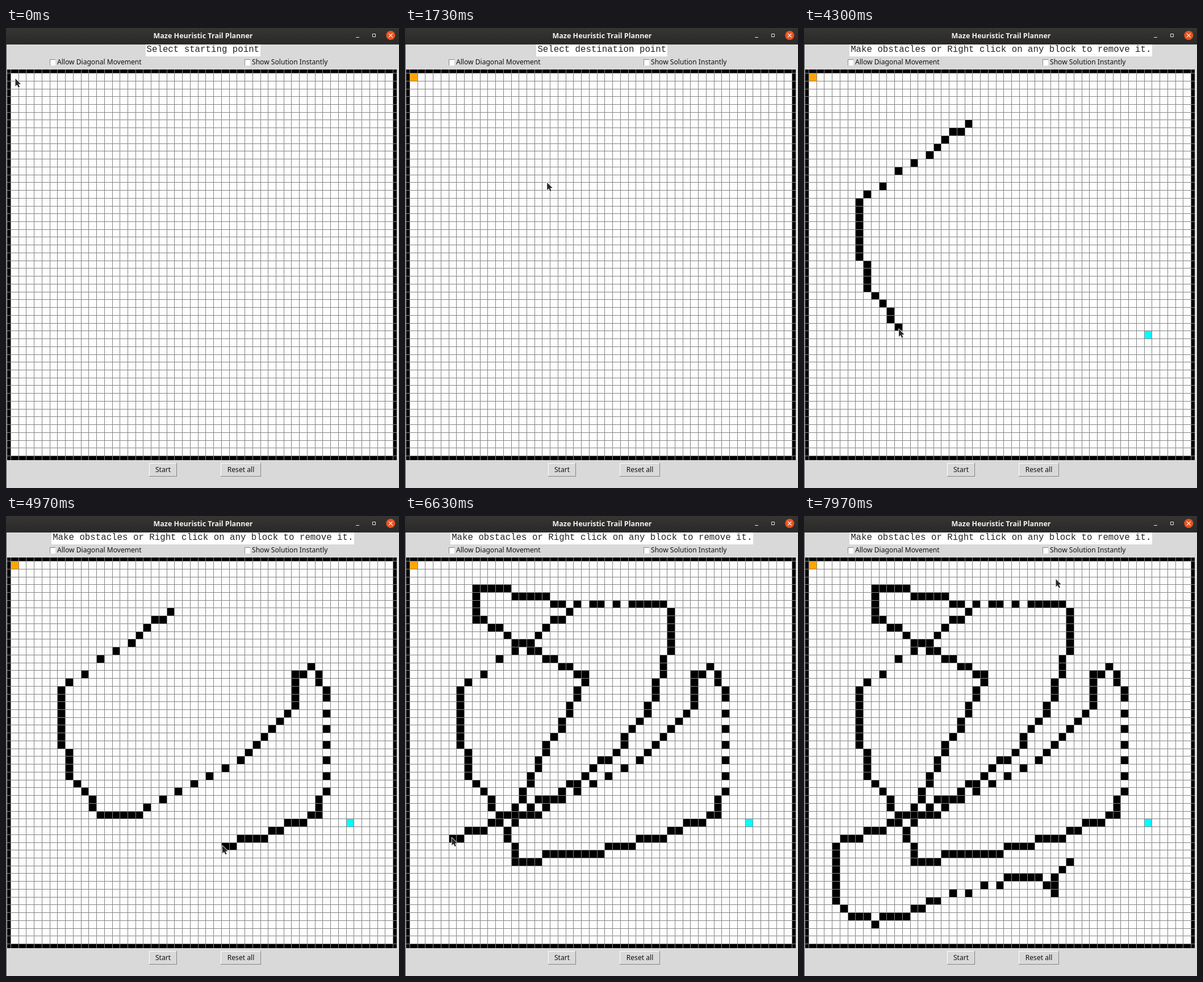
An HTML page with a canvas that plays this animation: 692 by 809 pixels, repeating every 8 s.

```html
<!DOCTYPE html>
<html lang="en">
<head>
<meta charset="utf-8">
<title>Maze Heuristic Trail Planner</title>
<style>
  html, body { margin: 0; width: 692px; height: 809px; overflow: hidden; background: #d9d9d9; }
  canvas { display: block; }
</style>
</head>
<body>
<canvas id="stage" width="692" height="809"></canvas>
<script>
const ctx = document.getElementById('stage').getContext('2d');
const LOOP = 8000, TICK = 100 / 3;
const CELLS = 49, PITCH = 13.735, LEFT = 8, TOP = 79.05;
const UI_FONT = '12.1px "Noto Sans", "Open Sans", sans-serif';
const INK = '#111', LINE = '#858585', FACE = '#d9d9d9';

const START_CLICK = 430, END_CLICK = 3430, DRAW_START = 3900;
const START = [0, 0], END = [43, 33];

// Corners of each pointer stroke, in cells.
const strokes = [
  { until: 4299, corners: [
    [20, 6], [18, 7], [15, 9.8], [7, 15], [6, 16], [6, 23], [7, 25], [7.3, 27], [11, 32.3]] },
  { until: 5665, corners: [
    [17, 31.4], [29, 25], [36, 18], [36, 14], [38, 13], [40, 17], [39.8, 29], [38.6, 32],
    [35, 33], [32, 35], [29, 35.4], [24, 36.6], [19, 37], [16, 37.6], [13, 38], [12.8, 36],
    [12.1, 34], [13.4, 31], [15, 28], [17.4, 23], [20.4, 18], [22, 14], [15, 11],
    [13, 9.6], [8, 6.6], [8, 6]] },
  { until: 6632, corners: [
    [8, 3], [12, 3.4], [19, 4.9], [28, 5], [32, 5], [33, 6], [33, 11], [32.4, 12],
    [30.4, 18], [26, 24], [24, 25], [21, 27.9], [19, 29], [18, 30], [16, 30], [14, 32],
    [12, 32], [9, 34], [5, 34.9]] },
  { until: 7250, corners: [
    [3, 36], [3, 43], [5, 45], [8, 45.6], [12, 45], [14, 43.8], [16, 42.8], [24, 41],
    [25, 40], [29, 40], [31, 42], [31, 40], [33, 38]] }
];

const lerp = (a, b, u) => a.map((v, i) => v + (b[i] - v) * u);
const smooth = u => u * u * (3 - 2 * u);

// The hand moves twice as fast on long legs, which leaves gaps in the wall.
function sampleLeg(from, to) {
  const length = Math.max(Math.abs(to[0] - from[0]), Math.abs(to[1] - from[1]));
  const n = Math.max(1, Math.round(length >= 8 ? length / 2 : length));
  return Array.from({ length: n }, (_, i) => lerp(from, to, (i + 1) / n));
}

const trail = [strokes[0].corners[0]];
const pace = [[DRAW_START, 0]];
for (const { until, corners } of strokes) {
  for (const corner of corners) trail.push(...sampleLeg(trail[trail.length - 1], corner));
  pace.push([until, trail.length - 1]);
}
const DRAW_END = pace[pace.length - 1][0];

const gridX = i => Math.round(LEFT + i * PITCH);
const gridY = i => Math.round(TOP + i * PITCH);
const center = ([c, r]) => [LEFT + (c + .5) * PITCH, TOP + (r + .5) * PITCH];

const approach = [[1150, 16.5, 89], [2500, 602.5, 547], [3350, 602.5, 547], [3500, 605, 543],
  [DRAW_START, ...center(trail[0])]];
const leave = [[DRAW_END, ...center(trail[trail.length - 1])], [7330, 470, 600], [7720, 443.5, 111]];

function track(keys, t, ease = u => u) {
  const k = keys.findIndex(key => key[0] > t);
  if (k === 0) return keys[0].slice(1);
  if (k < 0) return keys[keys.length - 1].slice(1);
  const [t0, ...a] = keys[k - 1], [t1, ...b] = keys[k];
  return lerp(a, b, ease((t - t0) / (t1 - t0)));
}

function pointerAt(t, progress) {
  if (t < DRAW_START) return track(approach, t, smooth);
  if (t >= DRAW_END) return track(leave, t, smooth);
  const i = Math.floor(progress);
  return center(lerp(trail[i], trail[i + 1], progress - i));
}

function box(color, x, y, w, h) {
  ctx.fillStyle = color;
  ctx.fillRect(x, y, w, h);
}

function text(str, x, y, font, color = INK, align = 'left') {
  ctx.font = font;
  ctx.fillStyle = color;
  ctx.textAlign = align;
  ctx.fillText(str, x, y);
}

function cells(color, c, r, span = 1) {
  box(color, gridX(c), gridY(r), gridX(c + span) - gridX(c), gridY(r + span) - gridY(r));
}

function titleBar() {
  const shade = ctx.createLinearGradient(0, 0, 0, 29);
  shade.addColorStop(0, '#363533');
  shade.addColorStop(1, '#292927');
  box(shade, 0, 0, 692, 29);
  text('Maze Heuristic Trail Planner', 347, 18,
    'bold 12.5px "Noto Sans", "Open Sans", sans-serif', '#f4f2ee', 'center');
  box('#e8e6e2', 616, 16, 6, 1);
  ctx.lineWidth = 1;
  ctx.strokeStyle = '#e8e6e2';
  ctx.strokeRect(645.5, 10.5, 5, 5);
  ctx.fillStyle = '#e95420';
  ctx.beginPath();
  ctx.arc(677.3, 13, 8, 0, 7);
  ctx.fill();
  ctx.strokeStyle = '#fff';
  ctx.lineWidth = 1.2;
  ctx.beginPath();
  ctx.moveTo(674, 9.7); ctx.lineTo(680.6, 16.3);
  ctx.moveTo(680.6, 9.7); ctx.lineTo(674, 16.3);
  ctx.stroke();
}

function checkbox(x, label) {
  box(LINE, x, 55, 10, 11);
  box('#fff', x + 1, 56, 9, 10);
  text(label, x + 13, 64, UI_FONT);
}

function button(x, w, label) {
  box(LINE, x, 765, w, 24);
  box('#fff', x, 765, w - 1, 23);
  box(FACE, x + 1, 766, w - 2, 22);
  text(label, x + w / 2, 781, UI_FONT, INK, 'center');
}

function message(str) {
  const w = str.length * 9.45 + 4;
  box('#fff', Math.round(346.8 - w / 2), 29, Math.round(w), 21);
  text(str, 346.8, 42, '15.75px "Liberation Mono", monospace', '#222', 'center');
}

function pointer(x, y) {
  const shape = [[0, 0], [0, 13.5], [3, 10.7], [5.3, 15.5], [7.6, 14.5], [5.4, 9.8], [9.5, 9.6]];
  ctx.beginPath();
  for (const [dx, dy] of shape) ctx.lineTo(x + dx, y + dy);
  ctx.closePath();
  ctx.lineJoin = 'round';
  ctx.strokeStyle = '#fff';
  ctx.lineWidth = 1.6;
  ctx.stroke();
  ctx.fillStyle = '#2a2a2a';
  ctx.fill();
}

function draw(t) {
  const [progress] = track(pace, t);
  box(FACE, 0, 0, 692, 809);
  box('#444', 0, 29, 1, 780);
  titleBar();
  message(t < START_CLICK ? 'Select starting point'
    : t < END_CLICK ? 'Select destination point'
    : 'Make obstacles or Right click on any block to remove it.');
  checkbox(77, 'Allow Diagonal Movement');
  checkbox(420, 'Show Solution Instantly');

  box('#000', 2, 73, 686, 687);
  cells('#fdfdfe', 0, 0, CELLS);
  if (t >= START_CLICK) cells('#ffa500', ...START);
  if (t >= END_CLICK) cells('#00ffff', ...END);
  if (t >= DRAW_START) {
    for (const [c, r] of trail.slice(0, Math.floor(progress) + 1)) {
      cells('#000', Math.round(c), Math.round(r));
    }
  }
  for (let i = 0; i <= CELLS; i++) {
    box(LINE, gridX(i), 73, 1, 687);
    box(LINE, 2, gridY(i), 686, 1);
  }

  button(252, 49, 'Start');
  button(378, 71, 'Reset all');
  pointer(...pointerAt(t, progress));
}

function frame() {
  const t = performance.now() % LOOP;
  draw(Math.floor((t + 3.4) / TICK) % 240 * TICK);
  requestAnimationFrame(frame);
}
frame();
</script>
</body>
</html>
```
